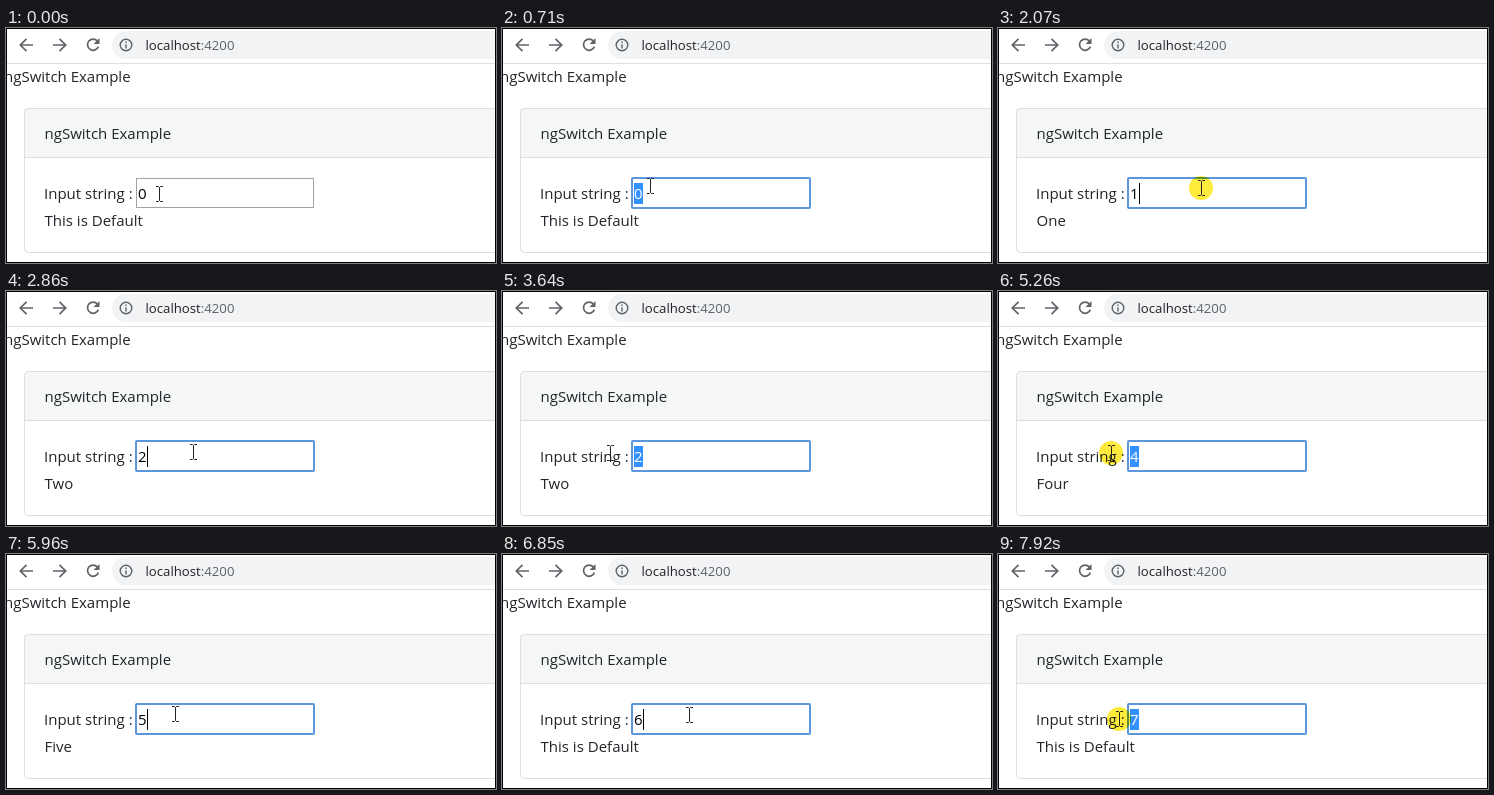
An HTML page for the animation above (8 s loop, 490 by 235 pixels).

```html
<!DOCTYPE html>
<html lang="en">
<head>
<meta charset="utf-8">
<title>ngSwitch Example</title>
<style>
html, body { margin: 0; width: 100%; height: 100%; overflow: hidden; background: #fff; }
svg { display: block; width: 490px; height: 235px; font: 15px "Open Sans", "Noto Sans", sans-serif; fill: #212529; }
.line { fill: none; stroke: #5f6368; stroke-width: 1.7; }
.thin { stroke-width: 1.4; }
.url { font-size: 13.2px; fill: #202124; }
#spot { fill: #ffeb3b; mix-blend-mode: multiply; }
</style>
</head>
<body>
<svg viewBox="0 0 490 235">
  <rect width="490" height="235" fill="#fff"/>

  <!-- browser bar -->
  <path d="M0 35.5H490" stroke="#dcdee0"/>
  <rect x="106" y="3" width="420" height="28" rx="14" fill="#f1f3f4"/>
  <path class="line" d="M27 17H14.5M20.5 10.8L14.3 17L20.5 23.2"/>
  <path class="line" d="M47 17H59.5M53.5 10.8L59.7 17L53.5 23.2"/>
  <path class="line" d="M91.4 13A5.6 5.6 0 1 0 92.4 18.6"/>
  <path d="M93.5 10V16H87.5Z" fill="#5f6368"/>
  <circle class="line thin" cx="120" cy="17" r="5.8"/>
  <path class="line thin" d="M120 13.5V15M120 16.3V20.5"/>
  <text class="url" x="139.5" y="22">localhost<tspan fill="#5f6368">:4200</tspan></text>

  <!-- page -->
  <text x="-2" y="54">ngSwitch Example</text>
  <path d="M18 130V84a4 4 0 0 1 4-4H490V130Z" fill="#f5f7f7"/>
  <rect x="18.5" y="80.5" width="500" height="144" rx="4" fill="none" stroke="#dcdede"/>
  <path d="M18 129.5H490" stroke="#dcdede"/>
  <text x="38.5" y="111">ngSwitch Example</text>
  <text x="38" y="171">Input string :</text>
  <text id="word" x="38.5" y="198"></text>

  <rect id="plain" x="130.5" y="150.5" width="177" height="29" fill="#fff" stroke="#a2a2a2"/>
  <rect id="focus" x="130" y="150" width="178" height="30" rx="1" fill="#fff" stroke="#5c95dc" stroke-width="2"/>
  <rect id="mark" x="132" y="155" width="9" height="21" fill="#3390ff"/>
  <text id="digit" x="132" y="171"></text>
  <path id="caret" d="M141.5 155V176" stroke="#000"/>

  <circle id="spot" r="12"/>
  <path id="beam" d="M-3-7.5H-.5L.5-6.5L1.5-7.5H4M.5-6.5V6.5M-3 7.5H-.5L.5 6.5L1.5 7.5H4" fill="none" stroke="#222"/>

  <rect x=".5" y=".5" width="489" height="234" fill="none" stroke="#000"/>
</svg>
<script>
const LOOP = 8000;
const words = ["This is Default", "One", "Two", "Three", "Four", "Five"];

// pointer moves: from time, to time, new x, new y
const moves = [
  [130, 480, 108, 159], [560, 910, 200, 157], [960, 1010, 203, 160],
  [2070, 2310, 117, 163], [2350, 2390, 120, 161], [2560, 2690, 187, 161],
  [3240, 3560, 108, 162], [3640, 3910, 218, 158],
  [4110, 4350, 112, 162], [4390, 4600, 214, 167],
  [4980, 5260, 113, 162], [5380, 5680, 187, 161],
  [5830, 5960, 169, 160], [5960, 6200, 113, 163], [6300, 6580, 187, 161],
  [6850, 7050, 119, 165], [7220, 7460, 175, 162], [7760, 7920, 121, 165]
];

// per digit: button down, digit selected, button up, next digit typed
const edits = [
  [230, 400, 560, 1570], [2070, 2260, 2350, 2860], [3290, 3470, 3600, 3880], [3910, 4300, 4390, 4620],
  [5010, 5210, 5310, 5660], [5990, 6110, 6260, 6560], [6900, 7020, 7220, 7440], [7800, 7900, LOOP, LOOP]
];

const $ = id => document.getElementById(id);
const show = (id, on) => $(id).setAttribute("visibility", on ? "visible" : "hidden");

function pointer(t) {
  let x = 153, y = 166;
  for (const [from, to, nx, ny] of moves) {
    const k = Math.min(1, Math.max(0, (t - from) / (to - from)));
    x += (nx - x) * k;
    y += (ny - y) * k;
  }
  return `translate(${Math.round(x)} ${Math.round(y)})`;
}

function draw(t) {
  const value = edits.filter(e => t >= e[3]).length;
  const selected = t >= edits[value][1];
  const focused = t >= edits[0][0];

  $("digit").textContent = value;
  $("digit").setAttribute("fill", selected ? "#fff" : "#000");
  $("word").textContent = words[value] || words[0];
  show("plain", !focused);
  show("focus", focused);
  show("mark", selected);
  show("caret", focused && !selected);
  show("spot", edits.some(([down, , up]) => t >= down && t < up));
  for (const id of ["spot", "beam"]) $(id).setAttribute("transform", pointer(t));
}

const start = performance.now();
function tick() {
  draw((performance.now() - start) % LOOP);
  requestAnimationFrame(tick);
}
tick();
</script>
</body>
</html>
```
